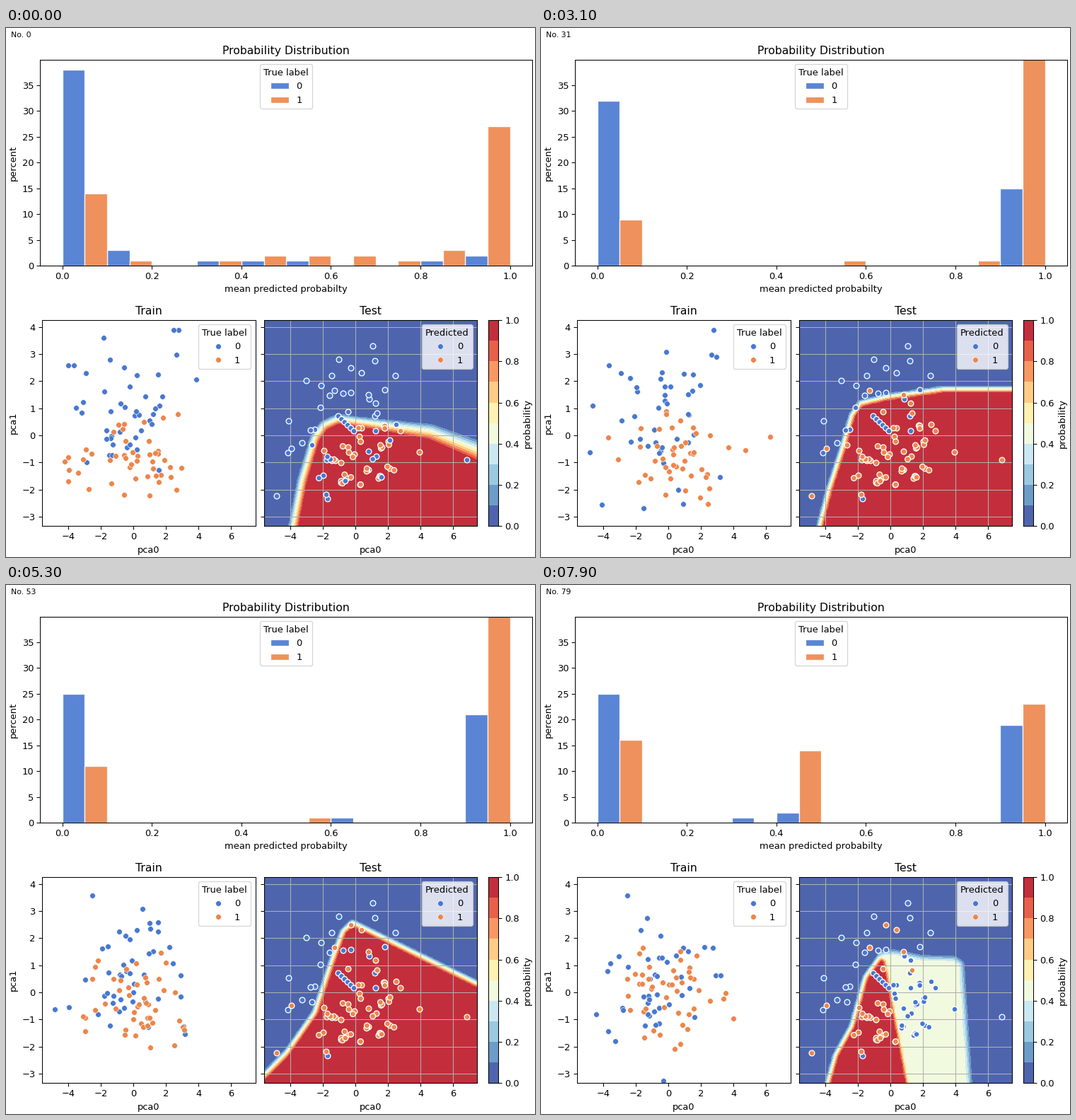
Animation, 748 px wide and 748 px high, one loop 8 s. Source, as a matplotlib script:

```python
import numpy as np
import matplotlib.pyplot as plt
from matplotlib.animation import FuncAnimation
from matplotlib.colors import ListedColormap
from matplotlib.lines import Line2D
from matplotlib.path import Path

SIZE, FRAMES, INTERVAL = 748, 80, 100
BLUE, ORANGE = "#4878d0", "#ee854a"
XLIM, YLIM = (-5.61, 7.49), (-3.347, 4.248)
TRAIN_BOX = (50.7, 413, 352.5, 704.3)  # left, top, right, bottom in pixels
TEST_BOX = (365, 413, 666.3, 704.3)
KEYS = np.array([0, 12, 31, 45, 53, 65, 79])

# Bin counts at each key moment; the last bin takes the remainder.
BINS_0 = [{0: 38, 1: 3, 3: 1, 4: 1, 5: 1, 8: 1}, {0: 36, 1: 1, 2: 1, 5: 1},
          {0: 32}, {0: 28, 2: 1, 8: 1}, {0: 25, 6: 1}, {0: 23, 6: 3},
          {0: 25, 3: 1, 4: 2}]
BINS_1 = [{0: 14, 1: 1, 3: 1, 4: 2, 5: 2, 6: 2, 7: 1, 8: 3},
          {0: 13, 1: 1, 7: 1, 8: 1}, {0: 9, 5: 1, 8: 1}, {0: 17, 1: 1, 8: 1},
          {0: 11, 5: 1}, {0: 14, 6: 14}, {0: 16, 4: 14}]
TOTALS = (47, 53)

# Upper outline of the high-probability region at each key moment.
CORES = [
    [(392, 780), (419, 640), (437, 580), (450, 562), (470, 553), (600, 571),
     (666, 597), (800, 660)],
    [(200, 731), (365, 596), (405, 563), (440, 558), (452, 551), (480, 549),
     (560, 556), (800, 556)],
    [(375, 780), (408, 652), (425, 600), (440, 548), (452, 531), (490, 522),
     (570, 511), (800, 511)],
    [(335, 760), (397, 663), (430, 600), (450, 545), (470, 492), (492, 475),
     (568, 486), (615, 456), (790, 340), (790, 590), (615, 627), (603, 638),
     (580, 760)],
    [(200, 860), (397, 662), (437, 605), (462, 530), (477, 490), (490, 478),
     (800, 630)],
    [(200, 815), (410, 617), (445, 574), (470, 550), (480, 558), (518, 655),
     (570, 760)],
    [(390, 760), (417, 665), (440, 624), (459, 555), (480, 526), (488, 530),
     (500, 600), (530, 760)],
]
# Plateaus that split off from the core at the last two key moments.
PLATEAUS = CORES[:5] + [
    [(470, 760), (475, 553), (482, 517), (500, 511), (580, 500), (600, 491),
     (800, 470)],
    [(470, 760), (480, 520), (500, 519), (540, 527), (585, 528), (595, 535),
     (610, 760)],
]
LEVELS = np.array([1, 1, 1, 1, 1, .65, .45])
LEFT_WIDTH = np.array([17, 13, 12, 14, 12, 10, 11])
RIGHT_WIDTH = np.array([32, 9, 11, 17, 12, 12, 11])

# Test samples in stage pixels, grouped by how their prediction behaves.
NEVER = [(519, 450), (471, 469), (522, 471), (461, 492), (425, 499),
         (446, 506), (458, 520), (477, 517), (488, 516), (514, 525),
         (536, 512), (445, 537), (400, 556), (437, 568), (523, 570),
         (522, 549), (455, 666), (419, 587), (399, 601)]
LATE = [(465, 513), (484, 543), (513, 519), (525, 545), (488, 481),
        (503, 488), (404, 595), (383, 662)]
FREE = [(551, 492), (523, 531), (552, 561), (558, 570), (431, 569),
        (433, 590), (585, 600), (652, 611)]
CENTRE = [(503, 566), (535, 562), (450, 598), (454, 611), (449, 633),
          (474, 615), (482, 637), (474, 643), (453, 660), (501, 646),
          (513, 625), (543, 623), (527, 637), (541, 585), (531, 593),
          (524, 606), (513, 599), (500, 578), (484, 593), (493, 603),
          (461, 612)]


def at(n, stack):
    """Blend the values of the two key moments around frame n."""
    i = min(np.searchsorted(KEYS, n, "right") - 1, len(KEYS) - 2)
    t = (n - KEYS[i]) / (KEYS[i + 1] - KEYS[i])
    return stack[i] * (1 - t) + stack[i + 1] * t


def to_data(pixels, box):
    left, top, right, bottom = box
    x = np.interp(pixels[:, 0], [left, right], XLIM)
    y = np.interp(pixels[:, 1], [top, bottom], YLIM[::-1])
    return np.column_stack([x, y])


def signed_distance(points, outline):
    """Distance to the region below the outline, positive inside."""
    corners = np.array(outline + [(outline[-1][0], 900), (outline[0][0], 900)],
                       float)
    edges = np.roll(corners, -1, axis=0) - corners
    offset = points[:, None] - corners
    length2 = np.maximum((edges ** 2).sum(1), 1e-9)
    t = np.clip((offset * edges).sum(2) / length2, 0, 1)
    distance = np.hypot(*np.moveaxis(offset - t[..., None] * edges, 2, 0)).min(1)
    return np.where(Path(corners).contains_points(points), distance, -distance)


def make_cloud(rng, count, mean, spread_x, spread_y):
    """Samples that are replaced at random, a few per frame."""
    def draw(n):
        mixed = n / (n + 20)  # the two classes drift together
        x = rng.normal(mean[0], spread_x, count)
        y = rng.normal(mean[1] * (1 - mixed), np.interp(mixed, [0, 1], spread_y),
                       count)
        return np.column_stack([x, y])
    cloud = [draw(0)]
    for n in range(1, FRAMES):
        fresh = rng.random((count, 1)) < 0.06
        cloud.append(np.where(fresh, draw(n), cloud[-1]))
    return cloud


rng = np.random.default_rng(4)
clouds = [make_cloud(rng, 46, (-0.2, 1.2), 1.8, (1.3, 1.15)),
          make_cloud(rng, 46, (0.2, -0.9), 1.75, (0.75, 1))]

# Chain of steadily negative samples, and close neighbours in the centre.
chain = np.linspace((470, 549), (492, 570), 6)
centre = np.array(CENTRE, float)
neighbours = rng.choice(centre, 34) + rng.normal(0, 4, (34, 2))
test = np.vstack([NEVER, chain, LATE, FREE, centre, neighbours])
first_late = len(NEVER) + len(chain)
first_free = first_late + len(LATE)
late_from = np.where(np.array(LATE)[:, 1] > 500, 28, 42)
slow = rng.random(len(test)) < 0.25

# The probability field is sampled on a grid and at the test samples.
COLS, ROWS = 76, 74
grid_x, grid_y = np.meshgrid(np.linspace(TEST_BOX[0], TEST_BOX[2], COLS),
                             np.linspace(TEST_BOX[1], TEST_BOX[3], ROWS))
grid = np.column_stack([grid_x.ravel(), grid_y.ravel()])
samples = np.vstack([grid, test])
core_fields = [signed_distance(samples, o) for o in CORES]
plateau_fields = [signed_distance(samples, o) for o in PLATEAUS]


def probability(n):
    width = np.interp(samples[:, 0], [500, 666],
                      [at(n, LEFT_WIDTH), at(n, RIGHT_WIDTH)])
    core = np.clip(0.5 + at(n, core_fields) / width, 0, 1)
    plateau = np.clip(0.5 + at(n, plateau_fields) / width, 0, 1)
    return np.maximum(core, at(n, LEVELS) * plateau)


def predict(n, p):
    label = p > 0.5
    if n < 8:
        label &= ~slow
    label[:first_late] = False
    label[first_late:first_free] |= n >= late_from
    return label


def dense(bins):
    return np.array([[row.get(i, 0) for i in range(10)] for row in bins])


def bin_counts(n, counts, total):
    result = np.rint(at(n, counts))
    result[-1] = total - result[:-1].sum()
    return result


fig = plt.figure(figsize=(8, 8), dpi=SIZE / 8, facecolor="white")


def add_axes(left, top, right, bottom):
    return fig.add_axes([left / SIZE, 1 - bottom / SIZE,
                         (right - left) / SIZE, (bottom - top) / SIZE])


def dot_legend(ax, title):
    handles = [Line2D([], [], ls="", marker="o", ms=6, mfc=c, mec="white",
                      mew=0.48, label=str(i))
               for i, c in enumerate((BLUE, ORANGE))]
    ax.legend(handles=handles, title=title, loc="upper right")


counter = fig.text(0.01, 1 - 13.2 / SIZE, "", fontsize="small")

hist = add_axes(48.2, 45, 744.2, 336.2)
bars = [hist.bar(np.arange(10) / 10 + shift, np.zeros(10), 0.05, align="edge",
                 color=color, alpha=0.9, edgecolor="white", linewidth=1,
                 label=label)
        for shift, color, label in ((0, BLUE, "0"), (0.05, ORANGE, "1"))]
hist.set(title="Probability Distribution", xlabel="mean predicted probabilty",
         ylabel="percent", xlim=(-0.05, 1.05), ylim=(0, 39.9))
hist.legend(title="True label", loc="upper center")
counts = [dense(BINS_0), dense(BINS_1)]

train = add_axes(*TRAIN_BOX)
train.set(title="Train", xlabel="pca0", ylabel="pca1")
train_dots = [train.scatter([], [], s=36, color=c, edgecolor="white",
                            linewidth=0.48) for c in (BLUE, ORANGE)]
dot_legend(train, "True label")

field = add_axes(*TEST_BOX)
field.set(title="Test", xlabel="pca0")
field.tick_params(labelleft=False)
field.set_axisbelow(True)
field.grid(True)
test_dots = field.scatter(*to_data(test, TEST_BOX).T, s=36, edgecolor="white",
                          linewidth=1, color=BLUE)
dot_legend(field, "Predicted")
for ax in (train, field):
    ax.set(xlim=XLIM, ylim=YLIM, xticks=range(-4, 7, 2), yticks=range(-3, 5))

# Ten bands of the diverging map, lightened as if drawn at 90 % opacity.
bands = plt.get_cmap("RdYlBu_r")(np.linspace(0.05, 0.95, 10))[:, :3]
bands = ListedColormap(bands * 0.9 + 0.1)
scale = add_axes(682, 413, 696.3, 704.3)
scale.pcolormesh([0, 1], np.linspace(0, 1, 11), np.arange(10)[:, None],
                 cmap=bands, vmin=-0.5, vmax=9.5)
scale.set(xticks=[], ylim=(0, 1), ylabel="probability")
scale.yaxis.set_label_position("right")
scale.yaxis.tick_right()

mesh = to_data(grid, TEST_BOX).reshape(ROWS, COLS, 2)
contours = []


def update(n):
    counter.set_text(f"No. {n}")
    for group, table, total in zip(bars, counts, TOTALS):
        for bar, height in zip(group, bin_counts(n, table, total)):
            bar.set_height(height)
    for dots, cloud in zip(train_dots, clouds):
        dots.set_offsets(cloud[n])

    p = probability(n)
    while contours:
        contours.pop().remove()
    contours.append(field.contourf(
        mesh[..., 0], mesh[..., 1], p[:len(grid)].reshape(ROWS, COLS),
        levels=np.linspace(0, 1, 11), cmap=bands, vmin=0, vmax=1, zorder=0))
    labels = predict(n, p[len(grid):])
    test_dots.set_facecolor([ORANGE if one else BLUE for one in labels])
    return []


animation = FuncAnimation(fig, update, frames=FRAMES, interval=INTERVAL,
                          init_func=lambda: [], repeat=True, repeat_delay=0,
                          blit=False)
plt.show()
```
